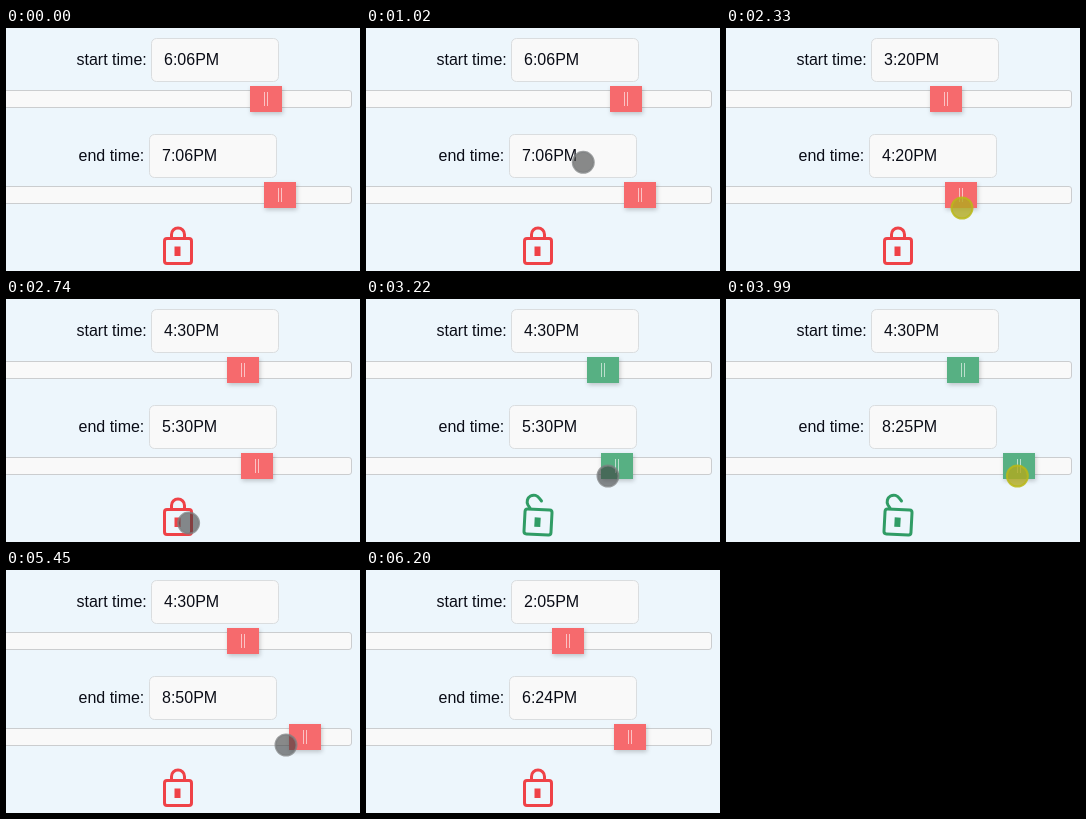
An HTML page for the animation above (7060 ms loop, 354 by 243 pixels).

```html
<!DOCTYPE html>
<html lang="en">
<head>
<meta charset="utf-8">
<title>Linked time sliders</title>
<style>
  html, body { margin: 0; width: 100%; height: 100%; overflow: hidden; background: #edf6fc; }
  svg { display: block; width: 354px; height: 243px; }
  text { font: 16px "Liberation Sans", Arial, sans-serif; fill: #0a0c16; }
  .box { fill: #f9f9f9; stroke: #dadddf; }
  .track { fill: #f9f9f9; stroke: #cbcdcf; }
  .thumb { fill: #f66a6d; filter: drop-shadow(1px 2px 2px rgba(0, 0, 0, .2)); }
  .open .thumb { fill: #57b083; }
  .grip { stroke: #fff; stroke-opacity: .6; fill: none; }
  .lock { fill: none; stroke: #ef4247; stroke-width: 3; stroke-linecap: round; }
  .lock .body { fill: #f4f8fb; filter: drop-shadow(2px 3px 2px rgba(0, 0, 0, .2)); }
  .lock .key { fill: #ef4247; stroke: none; }
  .lock.green { stroke: #309c65; }
  .green .key { fill: #309c65; }
  .green, .open .red { display: none; }
  .open .green { display: inline; }
  #cursor { fill: rgba(60, 62, 62, .6); stroke: rgba(125, 128, 130, .75); stroke-width: 2; }
  #cursor.down { fill: rgba(178, 170, 30, .8); stroke: rgba(186, 184, 24, .85); }
</style>
</head>
<body>
<svg id="stage" viewBox="0 0 354 243">
  <defs>
    <g id="knob">
      <rect class="thumb" x="-16" y="-13" width="32" height="26"/>
      <path class="grip" d="M-1.5-7v14M1.5-7v14"/>
    </g>
    <g id="case">
      <rect class="body" x="158.5" y="210.500" width="27" height="25" rx="2.500"/>
      <rect class="key" x="170" y="220" width="3" height="6.500"/>
    </g>
  </defs>

  <text x="70.5" y="37">start time:</text>
  <rect class="box" x="145.5" y="10.5" width="127" height="43" rx="5"/>
  <text id="startText" x="158" y="37"></text>
  <rect class="track" x="-6.5" y="62.5" width="352" height="17" rx="2.5"/>
  <use id="start" href="#knob" y="71"/>

  <text x="72.5" y="133">end time:</text>
  <rect class="box" x="143.5" y="106.5" width="127" height="43" rx="5"/>
  <text id="endText" x="156" y="133"></text>
  <rect class="track" x="-6.5" y="158.5" width="352" height="17" rx="2.5"/>
  <use id="end" href="#knob" y="167"/>

  <g class="lock red">
    <path d="M165.500 210v-3.500a6.500 6.500 0 0 1 13 0v3.500"/>
    <use href="#case"/>
  </g>
  <g class="lock green">
    <path d="M164 209l-2-3a6.500 6.500 0 0 1 11.500-6.500l2 2.500"/>
    <use href="#case" transform="rotate(3 172 223)"/>
  </g>
  <circle id="cursor" r="10.5"/>
</svg>
<script>
const LOOP = 7060, FIRST = 450, STEP = 69.16, LAST = 83;
const UNLOCK = 36, RELOCK = 66;
const $ = id => document.getElementById(id);

// Steps of the gesture and where it ends; a drag also sets the end time in minutes
const gestures = [
  { from: 0, to: 10, x: 213, y: 130 },
  { from: 10, to: 15, x: 176, y: 222 },
  { from: 16, to: 19, x: 269, y: 189 },
  { from: 21, to: 27, x: 236, y: 180, time: 260 },
  { from: 27, to: 30, x: 252, y: 180, time: 330 },
  { from: 30, to: 34, x: 178, y: 227 },
  { from: 36, to: 40, x: 242, y: 177 },
  { from: 43, to: 55.4, x: 298.5, y: 177, time: 530 },
  { from: 57, to: 63, x: 168, y: 231 },
  { from: 67, to: 72, x: 280, y: 175 },
  { from: 74, to: 80, x: 254, y: 179, time: 384 },
  { from: 81, to: 83, x: 254, y: 192 }
];

const easeOut = p => 1 - (1 - p) ** 2;

function poseAt(k) {
  const pose = { x: 320, y: 238, time: 426 };
  // pressed while clicking the lock, too
  pose.down = k === UNLOCK - 1 || k === RELOCK;
  for (const g of gestures) {
    if (k <= g.from) break;
    const p = easeOut(Math.min(1, (k - g.from) / (g.to - g.from)));
    for (const key of ["x", "y", "time"])
      if (key in g) pose[key] += (g[key] - pose[key]) * p;
    if ("time" in g && k < g.to + 1) pose.down = true;
  }
  return pose;
}

function clock(m) {
  return `${Math.floor(m / 60) || 12}:${String(m % 60).padStart(2, "0")}PM`;
}

function setTime(id, m) {
  $(id).setAttribute("x", Math.round(274.4 + (m - 426) * 0.24));
  $(id + "Text").textContent = clock(m);
}

function draw(t) {
  const k = Math.min(LAST, Math.floor((t - FIRST) / STEP));
  const pose = poseAt(k);
  const end = Math.round(pose.time);
  // while locked, the start time keeps its distance
  const start = k < UNLOCK ? end - 60 : k <= 74 ? 270 : end - 259;
  setTime("start", start);
  setTime("end", end);
  $("stage").classList.toggle("open", k >= UNLOCK && k < RELOCK);

  const cursor = $("cursor");
  cursor.style.display = k < 0 || k >= LAST ? "none" : "inline";
  cursor.setAttribute("cx", pose.x);
  cursor.setAttribute("cy", pose.y);
  cursor.classList.toggle("down", pose.down);
}

const began = performance.now();
function tick() {
  draw((performance.now() - began) % LOOP);
  requestAnimationFrame(tick);
}
tick();
</script>
</body>
</html>
```
